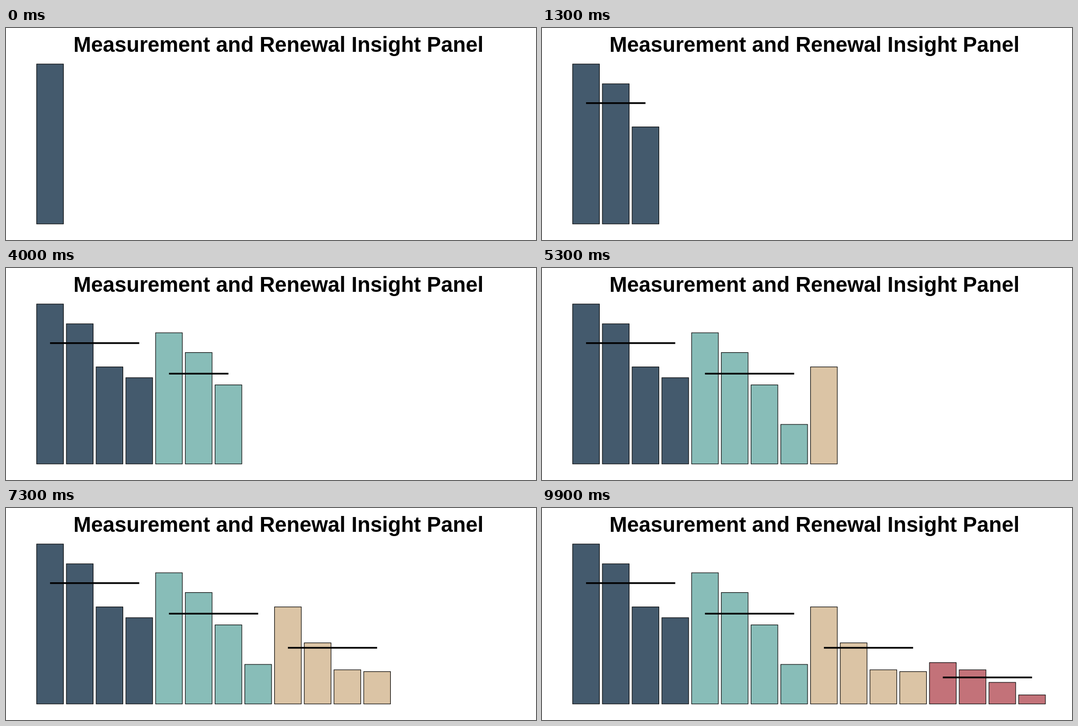
These frames come from a looping animation (1000x400 px, 10 s). An HTML page:

```html
<!DOCTYPE html>
<html lang="en">
<head>
<meta charset="utf-8">
<title>Bar chart with group means</title>
<style>
  html, body { margin: 0; width: 100%; height: 100%; overflow: hidden; background: #fff; }
  svg { display: block; width: 100vw; height: 100vh; }
  text { font: bold 40px "Liberation Sans", Arial, sans-serif; text-anchor: middle; }
  .bar { stroke: #000; stroke-width: 1.07; }
  .mean { transform-box: fill-box; transform-origin: left center; }
</style>
</head>
<body>
<svg id="chart" viewBox="0 0 1000 400">
  <text x="514" y="45.4">Measurement and Renewal Insight Panel</text>
</svg>
<script>
const groups = [
  { color: '#445a6d', values: [89, 78, 54, 48] },
  { color: '#88bdb8', values: [73, 62, 44, 22] },
  { color: '#dbc4a5', values: [54, 34, 19, 18] },
  { color: '#c37279', values: [23, 19, 12, 5] }
];
const FRAMES = 100, LOOP = 10000;
const X0 = 83.1, PITCH = 56.1, BASE = 369.7, UNIT = 3.39;
const BAR_W = PITCH * 0.9, LINE_W = 3.2;

const chart = document.getElementById('chart');
const timing = { duration: LOOP, iterations: Infinity, delay: -2 };

// Frame at which the reveal reaches bar i
const frameOf = i => Math.round(i * (FRAMES - 1) / 15);
const centre = i => X0 + PITCH * i;
const yOf = v => BASE - UNIT * v;

function addRect(cls, fill, x, y, width, height) {
  const el = document.createElementNS('http://www.w3.org/2000/svg', 'rect');
  const attrs = { class: cls, fill, x, y, width, height };
  for (const name in attrs) el.setAttribute(name, attrs[name]);
  chart.append(el);
  return el;
}

function addBar(i, value, color) {
  const bar = addRect('bar', color, centre(i) - BAR_W / 2, yOf(value), BAR_W, UNIT * value);
  if (i === 0) return;
  const offset = frameOf(i) / FRAMES;
  bar.animate([
    { opacity: 0, offset: 0 },
    { opacity: 0, offset },
    { opacity: 1, offset },
    { opacity: 1, offset: 1 }
  ], timing);
}

function addMean(first, values) {
  const mean = values.reduce((a, b) => a + b) / values.length;
  const last = values.length - 1;
  const line = addRect('mean', '#000', centre(first), yOf(mean) - LINE_W / 2, PITCH * last, LINE_W);
  const steps = [];
  if (first > 0) steps.push({ transform: 'scaleX(0)', offset: 0 });
  for (let k = 0; k <= last; k++) {
    const from = frameOf(first + k);
    const key = { transform: `scaleX(${k / last})`, offset: from / FRAMES };
    if (k < last) key.easing = `steps(${frameOf(first + k + 1) - from}, end)`;
    steps.push(key);
  }
  steps.push({ transform: 'scaleX(1)', offset: 1 });
  line.animate(steps, timing);
}

groups.forEach((g, n) => {
  const first = n * 4;
  g.values.forEach((v, k) => addBar(first + k, v, g.color));
  addMean(first, g.values);
});
</script>
</body>
</html>
```
